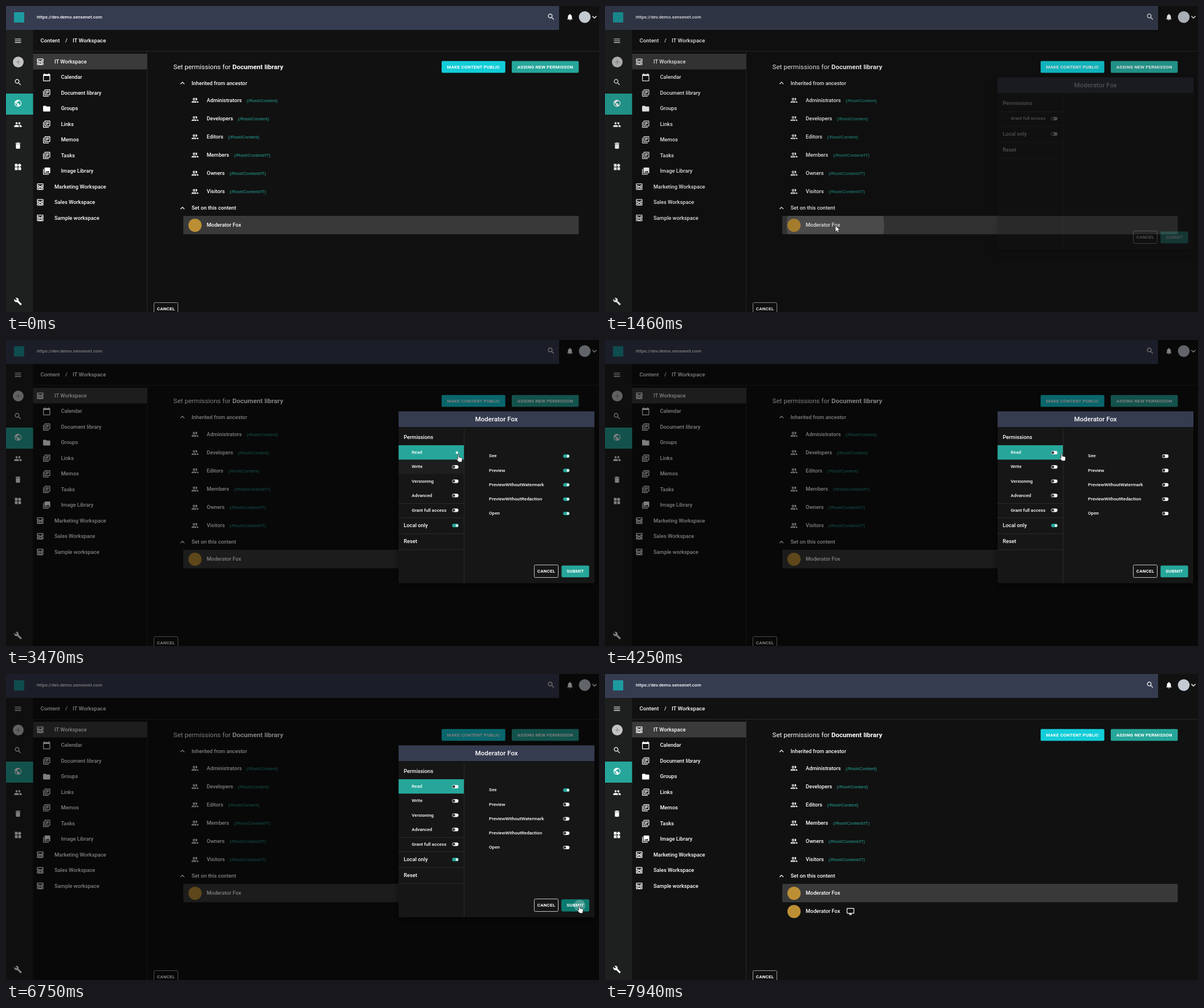
Recreate the animation shown at these times as an HTML page. Size 1040 by 538 pixels, loop 8500 ms.

```html
<!DOCTYPE html>
<html lang="en">
<head>
<meta charset="utf-8">
<title>Set permissions</title>
<style>
html, body { margin: 0; width: 100%; height: 100%; overflow: hidden; background: #111; }
svg { display: block; width: 100%; height: 100%; }
text { font-family: Roboto, sans-serif; font-weight: 500; fill: #fff; }
text.path { font-family: "Liberation Sans", Arial, sans-serif; font-weight: 400; fill: #26a69a; }
text.btn { font-weight: 600; letter-spacing: .0286em; }
</style>
</head>
<body>
<svg id="stage" viewBox="0 0 1040 538" xmlns="http://www.w3.org/2000/svg"></svg>
<script>
const LOOP = 8500;
const TEAL = '#26a69a', BAR = '#363c50', LINE = '#2a2a2a';
const USER = 'Moderator Fox';

const ICONS = {
  menu: 'M3 18h18v-2H3v2zm0-5h18v-2H3v2zm0-7v2h18V6H3z',
  search: 'M15.5 14h-.79l-.28-.27C15.41 12.59 16 11.11 16 9.5 16 5.91 13.09 3 9.5 3S3 5.91 3 9.5 5.91 16 9.5 16c1.61 0 3.09-.59 4.23-1.57l.27.28v.79l5 4.99L20.49 19l-4.99-5zm-6 0C7.01 14 5 11.99 5 9.5S7.01 5 9.5 5 14 7.01 14 9.5 11.99 14 9.5 14z',
  globe: 'M12 2C6.48 2 2 6.48 2 12s4.48 10 10 10 10-4.48 10-10S17.52 2 12 2zm-1 17.93c-3.95-.49-7-3.85-7-7.93 0-.62.08-1.21.21-1.79L9 15v1c0 1.1.9 2 2 2v1.93zm6.9-2.54c-.26-.81-1-1.39-1.9-1.39h-1v-3c0-.55-.45-1-1-1H8v-2h2c.55 0 1-.45 1-1V7h2c1.1 0 2-.9 2-2v-.41c2.93 1.19 5 4.06 5 7.41 0 2.08-.8 3.97-2.1 5.39z',
  people: 'M16 11c1.66 0 2.99-1.34 2.99-3S17.66 5 16 5c-1.66 0-3 1.34-3 3s1.34 3 3 3zm-8 0c1.66 0 2.99-1.34 2.99-3S9.66 5 8 5C6.34 5 5 6.34 5 8s1.34 3 3 3zm0 2c-2.33 0-7 1.17-7 3.5V19h14v-2.5c0-2.33-4.67-3.5-7-3.5zm8 0c-.29 0-.62.02-.97.05 1.16.84 1.97 1.97 1.97 3.45V19h6v-2.5c0-2.33-4.67-3.5-7-3.5z',
  trash: 'M6 19c0 1.1.9 2 2 2h8c1.1 0 2-.9 2-2V7H6v12zM19 4h-3.5l-1-1h-5l-1 1H5v2h14V4z',
  widgets: 'M13 13v8h8v-8h-8zM3 21h8v-8H3v8zM3 3v8h8V3H3zm13.66-1.31L11 7.34 16.66 13l5.66-5.66-5.66-5.65z',
  wrench: 'M22.7 19l-9.1-9.1c.9-2.3.4-5-1.5-6.9-2-2-5-2.4-7.4-1.3L9 6 6 9 1.6 4.7C.4 7.1.9 10.1 2.9 12.1c1.9 1.9 4.6 2.4 6.9 1.5l9.1 9.1c.4.4 1 .4 1.4 0l2.3-2.3c.5-.4.5-1.1.1-1.4z',
  bell: 'M12 22c1.1 0 2-.9 2-2h-4c0 1.1.89 2 2 2zm6-6v-5c0-3.07-1.64-5.64-4.5-6.32V4c0-.83-.67-1.5-1.5-1.5s-1.5.67-1.5 1.5v.68C7.63 5.36 6 7.92 6 11v5l-2 2v1h16v-1l-2-2z',
  down: 'M16.59 8.59L12 13.17 7.41 8.59 6 10l6 6 6-6z',
  up: 'M12 8l-6 6 1.41 1.41L12 10.83l4.59 4.58L18 14z',
  calendar: 'M20 3h-1V1h-2v2H7V1H5v2H4c-1.1 0-2 .9-2 2v16c0 1.1.9 2 2 2h16c1.1 0 2-.9 2-2V5c0-1.1-.9-2-2-2zm0 18H4V8h16v13z',
  library: 'M4 6H2v14c0 1.1.9 2 2 2h14v-2H4V6zm16-4H8c-1.1 0-2 .9-2 2v12c0 1.1.9 2 2 2h12c1.1 0 2-.9 2-2V4c0-1.1-.9-2-2-2zm0 14H8V4h12v12zM10 9h8v2h-8V9zm0 3h4v2h-4zm0-6h8v2h-8z',
  folder: 'M10 4H4c-1.1 0-1.99.9-1.99 2L2 18c0 1.1.9 2 2 2h16c1.1 0 2-.9 2-2V8c0-1.1-.9-2-2-2h-8l-2-2z',
  photos: 'M22 16V4c0-1.1-.9-2-2-2H8c-1.1 0-2 .9-2 2v12c0 1.1.9 2 2 2h12c1.1 0 2-.9 2-2zm-11-4l2.03 2.71L16 11l4 5H8l3-4zM2 6v14c0 1.1.9 2 2 2h14v-2H4V6H2z',
  inbox: 'M19 3H5c-1.1 0-2 .9-2 2v7c0 1.1.9 2 2 2h14c1.1 0 2-.9 2-2V5c0-1.1-.9-2-2-2zM5 10h3.13c.21.78.67 1.47 1.27 2H5v-2zm14 2h-4.4c.6-.53 1.06-1.22 1.27-2H19v2zm0-4h-5v1c0 1.07-.93 2-2 2s-2-.93-2-2V8H5V5h14v3zM14 15v1c0 1-.9 2-2 2s-2-1-2-2v-1H3v4c0 1.1.9 2 2 2h14c1.1 0 2-.9 2-2v-4h-7zM5 17h3.13c.2.8.7 1.5 1.27 2H5v-2zm14 2h-4.4c.6-.5 1.1-1.2 1.27-2H19v2z',
  group: 'M9 13.75c-2.34 0-7 1.17-7 3.5V19h14v-1.75c0-2.33-4.66-3.5-7-3.5zM4.34 17c.84-.58 2.87-1.25 4.66-1.25s3.82.67 4.66 1.25H4.34zM9 12c1.93 0 3.5-1.57 3.5-3.5S10.93 5 9 5 5.5 6.57 5.5 8.5 7.07 12 9 12zm0-5c.83 0 1.5.67 1.5 1.5S9.83 10 9 10s-1.5-.67-1.5-1.5S8.17 7 9 7zm7.04 6.81c1.16.84 1.96 1.96 1.96 3.44V19h4v-1.75c0-2.02-3.5-3.17-5.96-3.44zM15 12c1.93 0 3.5-1.57 3.5-3.5S16.93 5 15 5c-.54 0-1.04.13-1.5.35.63.89 1 1.98 1 3.15s-.37 2.26-1 3.15c.46.22.96.35 1.5.35z',
  monitor: 'M21 2H3c-1.1 0-2 .9-2 2v12c0 1.1.9 2 2 2h7v2H8v2h8v-2h-2v-2h7c1.1 0 2-.9 2-2V4c0-1.1-.9-2-2-2zm0 14H3V4h18v12z'
};

// Markup helpers; y is the vertical middle of text and icons.
const rect = (x, y, w, h, fill, more = '') =>
  `<rect x="${x}" y="${y}" width="${w}" height="${h}" fill="${fill}" ${more}/>`;
const disc = (x, y, r, fill, more = '') =>
  `<circle cx="${x}" cy="${y}" r="${r}" fill="${fill}" ${more}/>`;
const text = (x, y, size, str, more = '') =>
  `<text x="${x}" y="${y + size * .355}" font-size="${size}" ${more}>${str}</text>`;
const icon = (name, x, y, size = 14.5, fill = '#fff') =>
  `<path d="${ICONS[name]}" fill="${fill}" transform="translate(${x - size / 2} ${y - size / 2}) scale(${size / 24})"/>`;
const button = (x, y, w, h, label, fill, more = '') =>
  rect(x, y, w, h, fill, 'rx="2" ' + more) +
  text(x + w / 2, y + h / 2 - .3, 7.9, label, 'class="btn" text-anchor="middle"');
const toggle = (id, x, y) =>
  `<g id="${id}" transform="translate(${x} ${y})">` +
  rect(-5.6, -3.1, 11.2, 6.2, '#f4f4f4', 'rx="3.1" class="off"') +
  rect(-5.6, -3.1, 11.2, 6.2, TEAL, 'rx="3.1" class="on"') +
  disc(-2.7, 0, 2.3, '#333', 'class="thumb"') + '</g>';

function page() {
  const rail = [['menu', 61], ['search', 134], ['globe', 171], ['people', 208.5], ['trash', 245.5], ['widgets', 283], ['wrench', 519.5]];
  const tree = [
    ['inbox', 'IT Workspace'], ['calendar', 'Calendar', 1], ['library', 'Document library', 1],
    ['folder', 'Groups', 1], ['library', 'Links', 1], ['library', 'Memos', 1], ['library', 'Tasks', 1],
    ['photos', 'Image Library', 1], ['inbox', 'Marketing Workspace'], ['inbox', 'Sales Workspace'], ['inbox', 'Sample workspace']
  ];
  const groups = [
    ['Administrators', '', 422], ['Developers', '', 406.5], ['Editors', '', 389.5],
    ['Members', '/IT', 400], ['Owners', '/IT', 392], ['Visitors', '/IT', 392]
  ];
  const user = y => disc(331.5, y + .5, 11.6, '#bd8f35') + text(352, y, 9.28, USER);
  return rect(0, 0, 1040, 538, '#111') +
    rect(0, 0, 970, 42, BAR) + rect(0, 42, 47.5, 496, '#1e1f1f') +
    rect(14, 11, 18, 18, '#1d9aa0') +
    text(54, 19, 8.1, 'https://dev.demo.sensenet.com') +
    icon('search', 956, 19) + icon('bell', 989, 19.5, 14) +
    disc(1015, 19.5, 10.3, '#c3cad1') + icon('down', 1032, 19.5, 16) +
    rect(0, 154, 47.5, 37, TEAL) +
    disc(21.5, 98.5, 9.4, '#c4c4c4') +
    '<path d="M17.5 98.5h8m-4-4v8" stroke="#8a8a8a" stroke-width="1.2"/>' +
    rail.map(([n, y]) => icon(n, 21, y)).join('') +
    text(60.5, 60.5, 9.58, 'Content') + text(104, 60.5, 9.58, '/') + text(117, 60.5, 9.58, 'IT Workspace') +
    rect(47.5, 79, 992.5, 1, LINE) + rect(247, 79, 1, 459, LINE) +
    rect(47.5, 84, 200, 27.5, '#3a3a3a') +
    tree.map(([n, label, deep], i) => {
      const y = 97.7 + i * 27.46;
      return icon(n, deep ? 71.3 : 60, y + .3, 15) + text(deep ? 96.5 : 85, y, 9.28, label);
    }).join('') +
    text(293.5, 107.3, 11.6, 'Set permissions for <tspan font-weight="700">Document library</tspan>', 'style="font-weight:400"') +
    button(764, 96.8, 111.7, 20.7, 'MAKE CONTENT PUBLIC', '#13cdd8') +
    button(887, 96.8, 117.5, 20.7, 'ASSING NEW PERMISSON', TEAL) +
    icon('up', 309.5, 135.5, 15) + text(325.5, 135.3, 9.28, 'Inherited from ancestor') +
    groups.map(([label, sub, x], i) => {
      const y = 165.5 + i * 32.05;
      return icon('group', 331.5, y + .3, 14.4) + text(352, y - .2, 9.28, label) +
        text(x, y + .8, 8, `(/Root/Content${sub})`, 'class="path"');
    }).join('') +
    icon('up', 309.5, 355.3, 15) + text(325.5, 355, 9.28, 'Set on this content') +
    rect(311, 369, 693.5, 32.3, '#393939') +
    disc(404, 386, 0, '#fff', 'id="rowRipple" clip-path="url(#rowClip)"') +
    user(385) +
    `<g id="newRow">${user(417)}${icon('monitor', 430.5, 417.5)}</g>` +
    button(259.5, 521.5, 42, 22, 'CANCEL', 'none', 'stroke="#999"');
}

const RULES = ['Read', 'Write', 'Versioning', 'Advanced'];
const RIGHTS = ['See', 'Preview', 'PreviewWithoutWatermark', 'PreviewWithoutRedaction', 'Open'];

function dialog() {
  const line = y => rect(688.5, y, 114.5, 1, LINE);
  return rect(688.5, 125.5, 343.5, 302, '#121212', 'filter="url(#shadow)"') +
    rect(688.5, 125.5, 343.5, 27.5, BAR) +
    text(860.2, 139.3, 11.5, USER, 'text-anchor="middle"') +
    rect(803, 157, 1, 270.5, LINE) +
    text(697.5, 170.8, 9.28, 'Permissions') + line(185) +
    '<g clip-path="url(#listClip)">' + rect(688.5, 185, 114.5, 25.3, TEAL) +
    RULES.map((label, i) => {
      const y = 198 + i * 25.15;
      return rect(688.5, y - 12.5, 114.5, 25, '#fff', `id="hover${i}" opacity="0"`) +
        text(711.5, y - .6, 8.08, label) + toggle('rule' + i, 788, y);
    }).join('') + '</g>' +
    '<g id="lower">' + line(185.7) +
    text(711.5, 197.4, 8.08, 'Grant full access') + toggle('full', 788, 198) + line(210.7) +
    text(697.5, 224.6, 9.28, 'Local only') + toggle('local', 788, 224.9) + line(238.7) +
    text(697.5, 252.6, 9.28, 'Reset') + line(266.7) + '</g>' +
    '<g id="rights">' + RIGHTS.map((label, i) => {
      const y = 204 + i * 25.2;
      return text(847, y - .4, 8.08, label) + toggle('right' + i, 982.7, y + .2);
    }).join('') + '</g>' +
    button(926.5, 395.5, 42, 22, 'CANCEL', 'none', 'stroke="#c4c4c4"') +
    rect(974.3, 396.6, 48.4, 20.6, TEAL, 'rx="2"') +
    rect(974.3, 396.6, 48.4, 20.6, '#0b7a6e', 'rx="2" id="submitHover"') +
    text(998.5, 406.4, 7.9, 'SUBMIT', 'class="btn" text-anchor="middle"') +
    disc(1006, 407, 0, '#fff', 'id="submitRipple" clip-path="url(#submitClip)"');
}

const stage = document.getElementById('stage');
stage.innerHTML = `<defs>
  <clipPath id="rowClip">${rect(311, 369, 693.5, 32.3, '#000')}</clipPath>
  <clipPath id="listClip">${rect(688, 185, 115, 0, '#000', 'id="listBox"')}</clipPath>
  <clipPath id="submitClip">${rect(974.3, 396.6, 48.4, 20.6, '#000', 'rx="2"')}</clipPath>
  <filter id="shadow" x="-20%" y="-20%" width="140%" height="140%">
    <feDropShadow dx="0" dy="6" stdDeviation="7" flood-color="#000" flood-opacity=".5"/>
  </filter></defs>
  ${page()}
  ${rect(0, 0, 1040, 538, '#000', 'id="dim"')}
  <g id="dialog">${dialog()}</g>
  <g id="cursor" stroke="#111" stroke-width=".7" fill="#fff" stroke-linejoin="round">
    <path id="arrow" d="M0 0V11.2L2.6 8.8 4.3 12.6 6.1 11.8 4.4 8.1H8Z"/>
    <path id="hand" d="M-1.6 .8Q-.6-.6 .4 .8V5L5.4 6.2Q6.4 6.6 6.2 8L5.4 13.5H0L-3.9 8.6Q-4.2 7.2-2.8 7.4L-1.6 8.5Z"/>
  </g>`;

const el = {};
stage.querySelectorAll('[id]').forEach(n => el[n.id] = n);
const set = (id, name, v) => el[id].setAttribute(name, v);
const show = (id, on) => set(id, 'visibility', on ? 'visible' : 'hidden');

const ramp = (t, from, len) => Math.min(1, Math.max(0, (t - from) / len));
const smooth = p => p * p * (3 - 2 * p);
const ease = (t, from, len) => smooth(ramp(t, from, len));

// Cursor stops: time, x, y
const STOPS = [
  [360, 838, 486], [1000, 404, 386], [1650, 404, 386], [1970, 433, 384],
  [2140, 677, 358], [2740, 793, 326], [3130, 793, 326], [3450, 794, 201],
  [3720, 793, 199], [4150, 793, 199], [4890, 960, 201], [5150, 976, 203],
  [5650, 976, 203], [6170, 1004, 405], [6320, 1006, 407], [7680, 1006, 407], [7900, 1007, 522]
];
function cursorAt(t) {
  const i = STOPS.findIndex(s => s[0] > t);
  if (i === 0) return STOPS[0].slice(1);
  if (i < 0) return STOPS[STOPS.length - 1].slice(1);
  const [a, x, y] = STOPS[i - 1], [b, u, v] = STOPS[i];
  const p = ease(t, a, b - a);
  return [x + (u - x) * p, y + (v - y) * p];
}

function setToggle(id, on) {
  const part = name => el[id].querySelector('.' + name);
  const c = Math.round(51 + 204 * on);
  part('off').setAttribute('opacity', 1 - on);
  part('on').setAttribute('opacity', on);
  part('thumb').setAttribute('cx', -2.7 + 5.6 * on);
  part('thumb').setAttribute('fill', `rgb(${c},${c},${c})`);
}

function draw(t) {
  const fade = ease(t, 1385, 225) * (1 - ease(t, 6840, 200));
  set('dim', 'opacity', .5 * fade);
  set('dialog', 'opacity', fade);
  show('dialog', fade > 0);

  const open = 101.3 * ease(t, 1540, 300);
  set('listBox', 'height', open);
  set('lower', 'transform', `translate(0 ${open})`);
  show('rights', t >= 1540 && fade > 0);

  const readOn = 1 - ease(t, 4080, 150);
  RULES.forEach((_, i) => setToggle('rule' + i, i ? 0 : readOn));
  RIGHTS.forEach((_, i) => setToggle('right' + i, i ? readOn : Math.max(readOn, ease(t, 5370, 150))));
  setToggle('full', 0);
  setToggle('local', ease(t, 2990, 150));

  const [lagX, lagY] = cursorAt(t - 80);
  RULES.forEach((_, i) => {
    const near = 1 - Math.abs(lagY - 198 - i * 25.15) / 26;
    set('hover' + i, 'opacity', i && lagX < 803 && t > 2990 && t < 4200 ? .06 * Math.max(0, near) : 0);
  });

  set('rowRipple', 'r', Math.max(0, 85 * (t - 1310) / 150));
  set('rowRipple', 'opacity', .14 * (1 - ease(t, 1500, 350)));
  set('submitHover', 'opacity', ease(t, 6200, 150));
  set('submitRipple', 'r', 10 * ramp(t, 6640, 110) + 30 * ramp(t, 6750, 300));
  set('submitRipple', 'opacity', .25);
  show('newRow', t >= 6920);

  const [x, y] = cursorAt(t);
  const hand = t > 2680 && t < 4260 || t > 5210 && t < 5730 || t > 6130 && t < 7000;
  const live = t >= 360 && t < 7930;
  set('cursor', 'transform', `translate(${x} ${y})`);
  show('arrow', live && !hand);
  show('hand', live && hand);
}

const start = performance.now();
function tick() {
  draw((performance.now() - start) % LOOP);
  requestAnimationFrame(tick);
}
tick();
</script>
</body>
</html>
```
